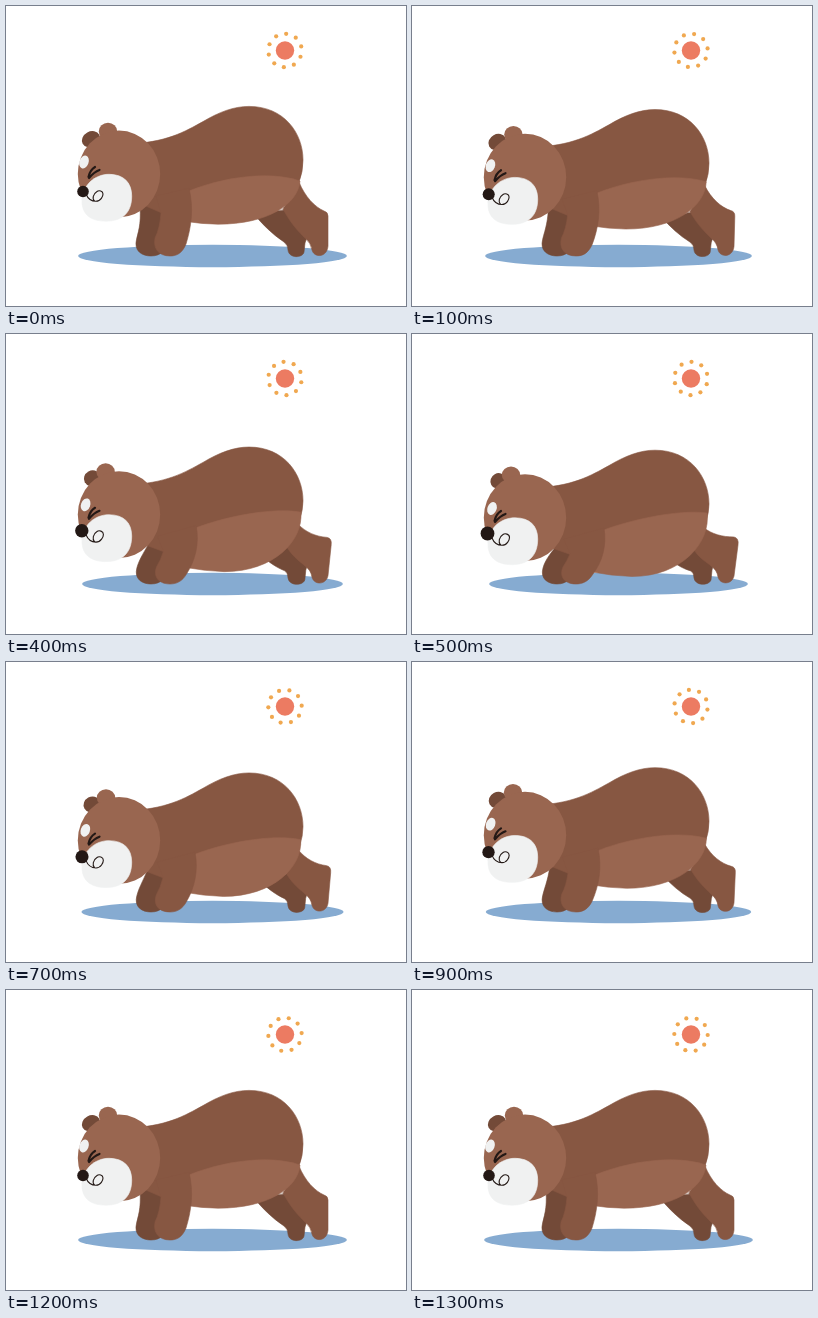
An HTML page with a canvas that plays this animation: 400 by 300 pixels, repeating every 1.4 s.

```html
<!DOCTYPE html>
<html>
<head>
<meta charset="utf-8">
<title>Bear push-ups</title>
<style>
  html, body { margin: 0; width: 100%; height: 100%; overflow: hidden; background: #fff; }
  canvas { display: block; }
</style>
</head>
<body>
<canvas width="400" height="300"></canvas>
<script>
const ctx = document.querySelector('canvas').getContext('2d');
const LOOP = 1400, STEP = 100;
const BROWN = '#875742', LIGHT = '#996650', DARK = '#734a38', INK = '#231815', WHITE = '#f0f1f1';
let dip = 0; // 0 = arms straight, 1 = chest lowered

const mix = (a, b) => a + (b - a) * dip;

// Blend two path strings that share the same commands.
function pose(up, down) {
  const low = down.match(/[\d.]+/g);
  let i = 0;
  return new Path2D(up.replace(/[\d.]+/g, n => mix(+n, +low[i++])));
}

function line(color, width, path) {
  ctx.strokeStyle = color;
  ctx.lineWidth = width;
  ctx.lineCap = ctx.lineJoin = 'round';
  ctx.stroke(path);
}

// The thin outline keeps the edges crisp.
function shape(color, up, down) {
  const path = pose(up, down);
  ctx.fillStyle = color;
  ctx.fill(path);
  line(color, 0.6, path);
}

function oval(color, x, y, rx, ry = rx, turn = 0) {
  ctx.fillStyle = color;
  ctx.beginPath();
  ctx.ellipse(x, y, rx, ry, turn, 0, Math.PI * 2);
  ctx.fill();
}

function sun(t) {
  oval('#ec7b62', 279, 44.5, 9.2);
  for (let i = 0; i < 10; i++) {
    const a = (4 + t * 0.0675 + i * 36) * Math.PI / 180;
    oval('#f0a850', 279 + 16.7 * Math.sin(a), 44.5 - 16.7 * Math.cos(a), 2.1);
  }
}

function body() {
  // far leg, near leg
  shape(DARK,
    'M248 208 C256 218 266 228 278 236 Q282 239 282 244 C283 253 297 252 298 246 L299 237 L301 231 L286 203 Z',
    'M256 224 C266 232 272 235 279 237 Q282 239 282 244 C283 252 297 252 299 246 L300 236 L301 232 L288 214 Z');
  shape(BROWN,
    'M293 176 C299 191 309 201 318 205 Q322 206 322 210 L322 240 C321 252 308 252 306 244 Q305 237 299 232 C293 226 285 218 277 203 Z',
    'M292 194 C300 200 310 203 322 203 Q327 204 326 211 L322 242 C320 251 308 251 306 243 Q305 236 299 232 C295 228 289 226 282 216 Z');
  // far arm
  shape(DARK,
    'M133.6 195 C135.5 215 133.4 222 130.6 233 C127.5 245 136 250 145 250 C155 250 160 244 160 236 L165 205 Z',
    'M148 208 C140 217 133 226 131 234 C128 245 136 250 145 250 C155 250 160 244 160 236 L168 215 Z');
  // torso
  shape(BROWN,
    'M120 138 C160 137 179 125.5 197 115.6 C213 106 228 100.4 243 100.4 C278 100.4 297 127 297 154 Q297 166 293 176 L250 195 L184 212 L157 207.5 L134 197.5 Z',
    'M120 154 C160 153 179 141.5 197 131.6 C213 122 228 116.2 243 116.2 C278 116.2 297 143 297 170 Q297 178 294 188 L250 210 L188 232 L160 221 L140 214 Z');
  // belly
  shape(LIGHT,
    'M183 185 C215 172 262 164 294 175 C292 198 262 218.2 212 218.2 Q196 218 180 215.5 Z',
    'M192 196 C215 187 265 175 295 179 C299 208 270 242.5 220 242.5 Q200 242 180 238 Z');
  // near arm
  shape(BROWN,
    'M150 190 L183 182 C188 203 185 222 180 238 C176 248 170 250 164 250 C152 250 147 242 149 232 Q154 222 155 207 Z',
    'M152 205 L192 194 C195 212 190 228 181 240 C176 248 170 250 164 250 C152 250 147 242 151 233 Q155 227 158 220 Z');
}

function head() {
  oval(DARK, mix(85, 86.5), mix(133.3, 147), mix(9.5, 8.2), 7.8, -0.5);
  oval(LIGHT, mix(102, 99), mix(125.4, 141), 9.2, 8.6);
  oval(LIGHT, 113, mix(168, 183.7), 41.2, 43.4);
  oval(WHITE, mix(78, 80), mix(156, 174.5), 4.6, 6.6, 0.35);
  shape(WHITE,
    'M76 193 C77 179 89 168.3 103 168.3 C118 168.3 125.7 177 125.7 190 C125.7 207 116 215.2 100 215.2 C84 215.2 75 208 76 193 Z',
    'M76 208 C77 194 89 183.8 103 183.8 C118 183.8 125.7 192 125.7 205 C125.7 222 116 230.7 100 230.7 C84 230.7 75 223 76 208 Z');
  line(INK, 2.2, pose(
    'M82.5 171 Q84 164 89 161 M83 172 Q88 166 93.5 164',
    'M82.5 187 Q84 180 89 177 M83 188 Q88 182 93.5 180'));
  line(INK, 1.1, pose(
    'M80 188 C82 193 86 195.3 90 195.3 C95 195.3 97 190 97 188 C97 185 93 184 91 185.5 C87 188 86 193 88.5 195',
    'M80 204 C82 209 86 211.3 90 211.3 C95 211.3 97.5 206 97.5 203.5 C97.5 200 93 199 91 200.5 C87 203 86 208 88.5 211'));
  oval(INK, mix(77, 75.5), mix(185.5, 199.5), mix(5.8, 6.9));
}

function draw(t) {
  dip = t < 500 ? t / 500 : Math.max(0, (1100 - t) / 600);
  ctx.clearRect(0, 0, 400, 300);
  sun(t);
  oval('#86abd1', 206.5, 250, mix(134.4, 129.4), 11.2);
  body();
  head();
}

function frame(now) {
  draw(Math.floor(now % LOOP / STEP) * STEP);
  requestAnimationFrame(frame);
}
requestAnimationFrame(frame);
</script>
</body>
</html>
```
